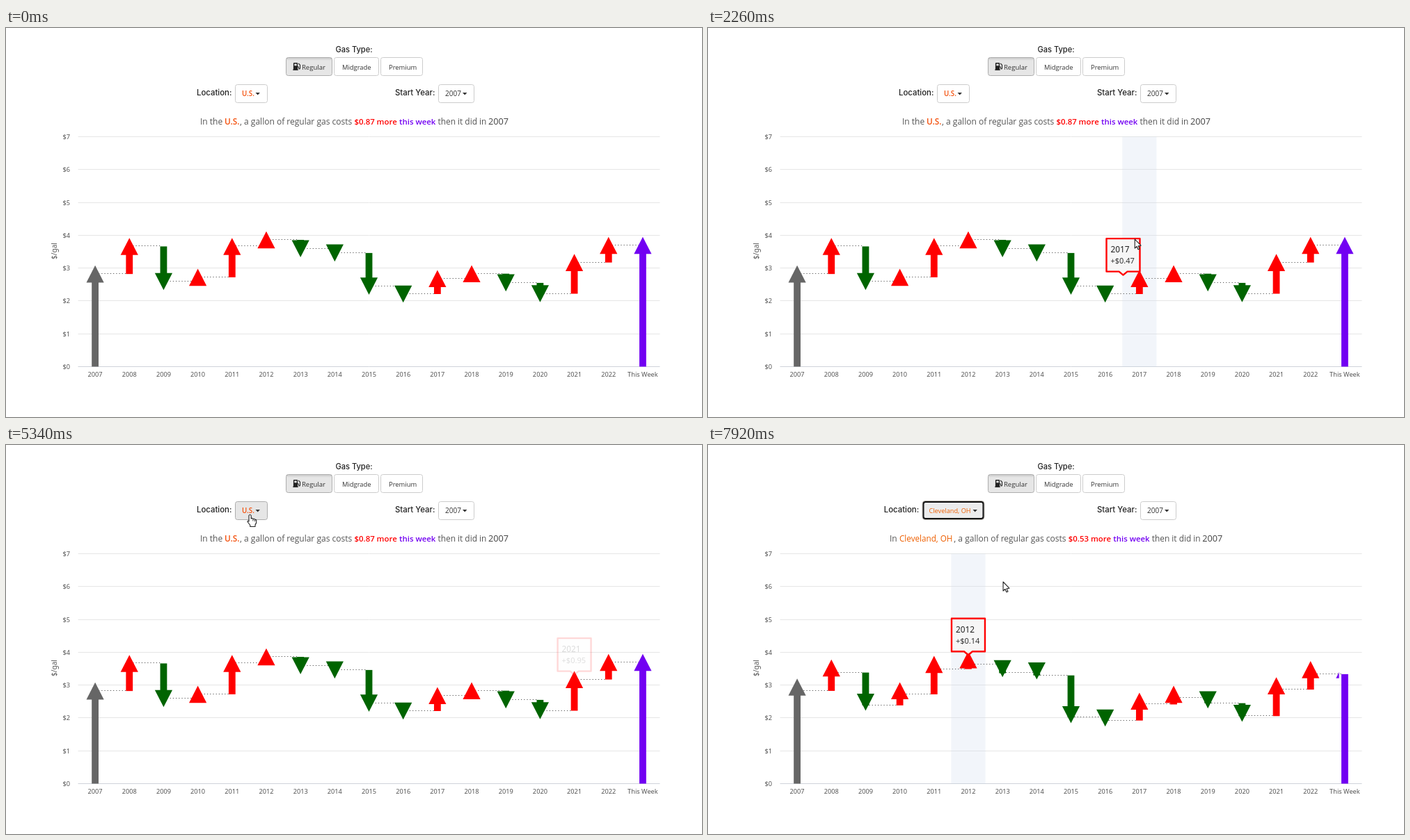
An HTML page with a canvas for the animation above (7990 ms loop, 1000 by 560 pixels).

```html
<!DOCTYPE html>
<html lang="en">
<head>
<meta charset="utf-8">
<title>Gas prices</title>
<style>
html, body { margin: 0; width: 1000px; height: 560px; overflow: hidden; background: #fff; }
canvas { display: block; }
</style>
</head>
<body>
<canvas id="stage" width="1000" height="560"></canvas>
<script>
const ctx = document.getElementById('stage').getContext('2d');
const LOOP = 7990;
const LEFT = 103.5, RIGHT = 939.5, TOP = 156.5, BASE = 487.5;
const COL = (RIGHT - LEFT) / 17, UNIT = (BASE - TOP) / 7;
const RED = '#ff0000', GREEN = '#006400', GRAY = '#666666', PURPLE = '#7200f2';
const OPEN = '"Open Sans", sans-serif', NOTO = '"Noto Sans", sans-serif', INTER = 'Inter, sans-serif';

// times of the interface events
const ENTER = 660, LEAVE = 4350, FADE = 5180, FADED = 5370, HOVER = 5260;
const OPENED = 5560, PICKED = 6260, REFRESH = 7080, GROW = 7048;

const national = [2.82, 3.66, 2.59, 2.72, 3.66, 3.86, 3.59, 3.46, 2.45, 2.21, 2.68, 2.83, 2.55, 2.22, 3.17, 3.69, 3.69];
const city = [2.94, 3.52, 2.48, 2.83, 3.63, 3.77, 3.50, 3.43, 2.10, 2.00, 2.51, 2.72, 2.55, 2.14, 2.98, 3.47, 3.47];
const places = ['U.S.', 'Boston, MA', 'California', 'Chicago, IL', 'Cleveland, OH', 'Colorado', 'Denver, CO',
  'Florida', 'Houston, TX', 'Los Angeles, CA', 'Massachusetts', 'Miami, FL', 'Minnesota'];

// pointer path: time, x, y
const path = [
  [660, 930, 286], [935, 692, 228], [1010, 676, 225], [1420, 598, 282], [1850, 492, 330],
  [2260, 613, 304], [3050, 805, 325], [3420, 690, 300], [3790, 915, 285], [3950, 927, 288],
  [4350, 812, 150], [4790, 503, 112], [4990, 408, 110], [5200, 408, 110], [5330, 350, 100],
  [5600, 350, 100], [5950, 368, 178], [6020, 380, 199], [6220, 380, 199], [6600, 378, 196],
  [7080, 378, 196], [7360, 391, 193], [7920, 424, 197], [7990, 428, 197]
];

const yOf = v => BASE - v * UNIT;
const mid = i => LEFT + COL * (i + 0.5);
const nameOf = i => i === 16 ? 'This Week' : String(2007 + i);
const clamp = (v, a, b) => Math.max(a, Math.min(b, v));

function pointer(t) {
  let i = 1;
  while (i < path.length - 1 && path[i][0] < t) i++;
  const [t0, x0, y0] = path[i - 1], [t1, x1, y1] = path[i];
  const k = clamp((t - t0) / (t1 - t0), 0, 1);
  return [x0 + (x1 - x0) * k, y0 + (y1 - y0) * k];
}

function hovered(t) {
  if (t >= REFRESH) return 5;
  if (t < ENTER || t >= FADED) return -1;
  return clamp(Math.floor((pointer(Math.min(t, LEAVE))[0] - LEFT) / COL), 0, 16);
}

function anchor(i, data) {
  return [mid(i), yOf(i && i < 16 ? Math.max(data[i], data[i - 1]) : data[i])];
}

// the tooltip eases after the hovered column
const STEP = 10, trail = [];
{
  let [x, y] = anchor(16, national);
  const k = 1 - Math.exp(-STEP / 80);
  for (let t = ENTER; t <= FADED; t += STEP) {
    const [tx, ty] = anchor(clamp(hovered(t), 0, 16), national);
    trail.push([x += (tx - x) * k, y += (ty - y) * k]);
  }
}

function tipAt(t) {
  if (t >= REFRESH) return anchor(5, city);
  return trail[clamp(Math.floor((t - ENTER) / STEP), 0, trail.length - 1)];
}

function text(s, x, y, size, color = '#333', family = OPEN, weight = 400, align = 'left') {
  ctx.font = `${weight} ${size}px ${family}`;
  ctx.fillStyle = color;
  ctx.textAlign = align;
  ctx.fillText(s, x, y);
}

function line(x0, y0, x1, y1, color) {
  ctx.strokeStyle = color;
  ctx.lineWidth = 1;
  ctx.beginPath();
  ctx.moveTo(x0, y0);
  ctx.lineTo(x1, y1);
  ctx.stroke();
}

function shape(points, fill, stroke, width = 1) {
  ctx.beginPath();
  points.forEach(([x, y]) => ctx.lineTo(x, y));
  ctx.closePath();
  if (fill) { ctx.fillStyle = fill; ctx.fill(); }
  if (stroke) { ctx.strokeStyle = stroke; ctx.lineWidth = width; ctx.stroke(); }
}

function box(x, y, w, h, r, fill, stroke, width = 1) {
  ctx.beginPath();
  ctx.roundRect(x, y, w, h, r);
  ctx.fillStyle = fill;
  ctx.fill();
  ctx.strokeStyle = stroke;
  ctx.lineWidth = width;
  ctx.stroke();
}

function button(x, w, y, state) {
  const dark = state !== 'plain';
  box(x + 0.5, y + 0.5, w, 26, 3, dark ? '#e6e6e6' : '#fff', dark ? '#adadad' : '#ccc');
  if (state === 'active') {
    const g = ctx.createLinearGradient(0, y + 1, 0, y + 5);
    g.addColorStop(0, 'rgba(0,0,0,.12)');
    g.addColorStop(1, 'rgba(0,0,0,0)');
    ctx.fillStyle = g;
    ctx.fillRect(x + 1, y + 1, w - 1, 4);
  }
}

function caret(x, y) {
  shape([[x, y], [x + 6.4, y], [x + 3.2, y + 3.4]], '#333');
}

function pump(x, y) {
  ctx.fillStyle = '#222';
  ctx.beginPath();
  ctx.roundRect(x + 0.6, y, 6.2, 10, 1);
  ctx.fill();
  ctx.fillRect(x, y + 9.4, 7.4, 1.5);
  ctx.fillStyle = '#e6e6e6';
  ctx.fillRect(x + 2, y + 1.5, 3.4, 2.8);
  ctx.strokeStyle = '#222';
  ctx.lineWidth = 1.1;
  ctx.beginPath();
  ctx.moveTo(x + 6.8, y + 5.5);
  ctx.quadraticCurveTo(x + 8.3, y + 5.6, x + 8.3, y + 8);
  ctx.quadraticCurveTo(x + 9.3, y + 10, x + 10.2, y + 8);
  ctx.lineTo(x + 10.2, y + 3.2);
  ctx.lineTo(x + 7.8, y + 1);
  ctx.stroke();
}

function controls(t) {
  text('Gas Type:', 500, 35, 11.1, '#222', INTER, 500, 'center');
  button(402, 66, 42, 'active');
  button(471, 64, 42, 'plain');
  button(538, 60, 42, 'plain');
  pump(412.3, 50);
  text('Regular', 425, 60, 9.5);
  text('Midgrade', 483, 60, 9.4);
  text('Premium', 550, 60, 9.4);

  text('Start Year:', 559, 97, 11.4, '#222', INTER, 500);
  button(621, 51, 81, 'plain');
  text('2007', 631, 98, 10);
  caret(656, 93);

  if (t < PICKED) {
    text('Location:', 274, 97, 11.4, '#222', INTER, 500);
    button(329, 46, 81, t < HOVER ? 'plain' : t < OPENED ? 'hover' : 'active');
    text('U.S.', 339, 98, 9.8, '#f4500c', OPEN, 600);
    caret(358.5, 93);
  } else {
    text('Location:', 252.7, 97, 11.4, '#222', INTER, 500);
    box(308, 80.5, 89, 27, 4, '#fff', '#b5b0a8');
    box(309.5, 82, 86, 24, 3, '#ececec', '#111', 2);
    text('Cleveland, OH', 317.5, 98, 9.2, '#ee5f00');
    caret(380.5, 93);
  }
}

function headline(t) {
  const us = t < REFRESH, y = 139, dx = us ? 0 : 17.3, ink = '#555';
  if (us) {
    text('In the', 279, y, 12, ink);
    text('U.S.', 314, y, 11.8, '#f4500c', OPEN, 600);
  } else {
    text('In', 261, y, 12, ink);
    text('Cleveland, OH', 275, y, 11.7, '#ee5f00', OPEN, 500);
  }
  text(', a gallon of regular gas costs', 336 + dx, y, 12, ink);
  text(us ? '$0.87 more' : '$0.53 more', 500.5 + dx, y, 11.4, RED, OPEN, 600);
  text('this week', 565 + dx, y, 11.4, PURPLE, OPEN, 600);
  text('then it did in', 620.5 + dx, y, 11.9, ink);
  text('2007', 693 + dx, y, 12.7, '#444', OPEN, 500);
}

function axes(t) {
  for (let v = 0; v <= 7; v++) {
    const y = Math.floor(yOf(v)) + 0.5;
    line(LEFT, y, RIGHT, y, v ? '#e6e6e6' : '#cfd3da');
    text('$' + v, 92, y + 3, 9.2, '#555', NOTO, 400, 'right');
  }
  for (let i = 0; i < 17; i++) text(nameOf(i), mid(i), 502, 9.2, '#555', NOTO, 400, 'center');
  ctx.save();
  ctx.translate(73, 321);
  ctx.rotate(-Math.PI / 2);
  text('$/gal', 0, 0, 10, '#555', NOTO, 400, 'center');
  ctx.restore();

  const i = hovered(t);
  if (i >= 0 && (t < FADE || t >= REFRESH)) {
    ctx.fillStyle = 'rgba(204,214,235,.25)';
    ctx.fillRect(LEFT + i * COL, TOP, COL, BASE - TOP);
  }
}

function colorOf(i, data) {
  return i === 0 ? GRAY : i === 16 ? PURPLE : data[i] >= data[i - 1] ? RED : GREEN;
}

function arrows(t) {
  const data = t < REFRESH ? national : city;
  const grow = t < REFRESH ? 1 : (1 - Math.cos(Math.PI * clamp((t - GROW) / 1000, 0, 1))) / 2;
  const level = i => yOf(data[i] * grow);

  ctx.setLineDash([1.2, 3]);
  for (let i = 0; i < 16; i++) {
    const y = Math.round(level(i)) - 0.5;
    line(mid(i) + 5, y, mid(i + 1) - 5, y, grow < 0.5 ? '#aaa' : '#555');
  }
  ctx.setLineDash([]);

  for (let i = 0; i < 17; i++) {
    const from = i % 16 ? level(i - 1) : BASE, to = level(i);
    ctx.fillStyle = colorOf(i, data);
    ctx.fillRect(mid(i) - 4.9, Math.min(from, to), 9.8, Math.max(1, Math.abs(to - from)));
  }

  ctx.save();
  ctx.beginPath();
  ctx.rect(LEFT, 100, (RIGHT - LEFT) * grow, 400);
  ctx.clip();
  for (let i = 0; i < 17; i++) {
    const x = mid(i), y = yOf(data[i]), color = colorOf(i, data);
    const d = color === GREEN ? -12.3 : 12.3;
    shape([[x, y - d], [x + 12.6, y + d], [x - 12.6, y + d]], color);
  }
  ctx.restore();
}

function tooltip(t) {
  const i = hovered(t);
  if (i < 0) return;
  const data = t < REFRESH ? national : city;
  const [ax, ay] = tipAt(t);
  const w = i === 16 ? 84 : 48, h = 47.5;
  const x = clamp(ax - w / 2, LEFT, 944.5 - w), y = ay - 12 - h, b = y + h;
  const px = clamp(ax, x + 8, x + w - 8);
  const diff = i ? data[i] - data[i - 1] : 0;
  const note = i % 16 ? (diff < 0 ? '-$' : '+$') + Math.abs(diff).toFixed(2) : '$' + data[i].toFixed(2) + ' per gal';

  ctx.save();
  if (t >= FADE && t < REFRESH) ctx.globalAlpha = clamp((FADED - t) / (FADED - FADE), 0, 1);
  ctx.lineJoin = 'round';
  shape([[x, y], [x + w, y], [x + w, b], [px + 6, b], [px, b + 5], [px - 6, b], [x, b]],
    'rgba(247,247,247,.9)', colorOf(i, data), 2.4);
  text(nameOf(i), x + 6, y + 20, 11.8, '#222', NOTO, 500);
  text(note, x + 6, y + 36, i === 16 ? 11.7 : 11, '#333', NOTO);
  ctx.restore();
}

function menu(t) {
  if (t < OPENED || t >= PICKED) return;
  const x = 329.5, y = 109.5, row = 18.7, py = pointer(t)[1];
  box(x, y, 110, 247, 3, '#fff', '#ccc');
  places.forEach((name, i) => {
    const top = y + 2 + i * row;
    if (py >= top && py < top + row) {
      ctx.fillStyle = '#f5f5f5';
      ctx.fillRect(x + 1, top, 108, row);
    }
    text(name, x + 14, top + 13, 9.5);
  });
}

function cursor(t) {
  if (t < ENTER) return;
  const [x, y] = pointer(t);
  ctx.save();
  ctx.translate(x, y);
  ctx.lineJoin = 'round';
  if (t >= HOVER && t < PICKED) {
    ctx.beginPath();
    ctx.moveTo(-1, 10);
    ctx.lineTo(-1, 1.5);
    ctx.quadraticCurveTo(0.6, -1, 2.2, 1.5);
    ctx.lineTo(2.2, 6);
    ctx.quadraticCurveTo(4, 4.6, 5, 6.6);
    ctx.quadraticCurveTo(6.8, 5.6, 7.6, 7.4);
    ctx.quadraticCurveTo(9.6, 6.8, 9.8, 9);
    ctx.quadraticCurveTo(10, 13, 8, 15);
    ctx.lineTo(8, 17.5);
    ctx.lineTo(0.8, 17.5);
    ctx.lineTo(0.8, 15.5);
    ctx.lineTo(-3, 10.5);
    ctx.quadraticCurveTo(-3, 8.2, -1, 10);
    ctx.closePath();
    ctx.fillStyle = '#fff';
    ctx.fill();
    ctx.strokeStyle = '#222';
    ctx.lineWidth = 1.1;
    ctx.stroke();
    line(5, 7, 5, 9.5, '#222');
    line(7.6, 7.8, 7.6, 10, '#222');
  } else {
    shape([[0, 0], [0, 13], [2.9, 10.4], [4.8, 14.8], [6.9, 13.9], [5, 9.7], [8.8, 9.2]], '#fff', '#222', 1.1);
  }
  ctx.restore();
}

function draw(t) {
  ctx.fillStyle = '#fff';
  ctx.fillRect(0, 0, 1000, 560);
  controls(t);
  headline(t);
  axes(t);
  arrows(t);
  tooltip(t);
  menu(t);
  cursor(t);
}

const start = performance.now();
function tick() {
  draw((performance.now() - start) % LOOP);
  requestAnimationFrame(tick);
}
tick();
</script>
</body>
</html>
```
